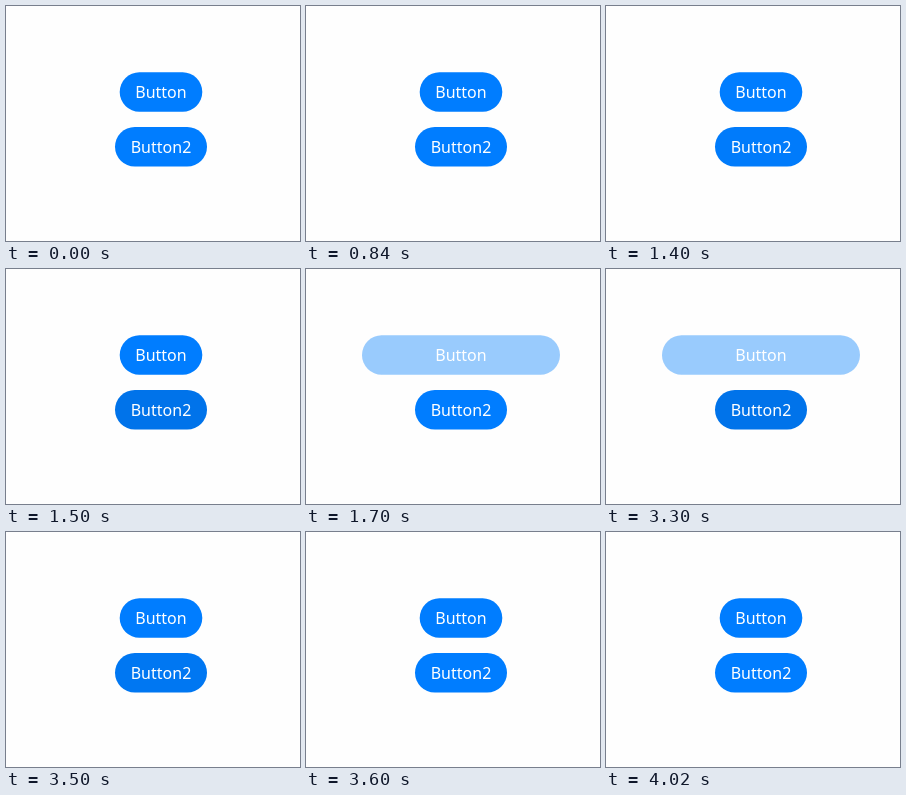
An HTML page that plays this animation: 294x235 px, repeating every 4.3 s.

```html
<!DOCTYPE html>
<html lang="en">
<head>
<meta charset="utf-8">
<title>Button states</title>
<style>
  html, body { margin: 0; width: 100%; height: 100%; overflow: hidden; background: #fefefe; }
  svg { display: block; width: 294px; height: 235px; }
  rect { fill: #007dff; animation: 4300ms step-end infinite; }
  text { font: 500 16px "Noto Sans", sans-serif; fill: #fff; text-anchor: middle; }
  .toggled { animation-name: toggle; }
  .pressed { animation-name: press; }

  /* Wide and disabled from 1700 ms to 3500 ms */
  @keyframes toggle {
    0%, 81.395% { x: 113.7px; width: 82.6px; fill: #007dff; }
    39.534% { x: 56px; width: 198px; fill: #99cbfd; }
  }

  /* Two presses, each fading in or out in short steps */
  @keyframes press {
    0%, 39.534%, 83.72% { fill: #007dff; }
    32.558% { fill: #007bfb; }
    34.883% { fill: #0073ea; }
    76.744% { fill: #0073ea; }
    81.395% { fill: #0077f2; }
  }
</style>
</head>
<body>
<svg viewBox="0 0 294 235">
  <rect class="toggled" x="113.7" y="66.3" width="82.6" height="39.5" rx="19.75"/>
  <text x="155" y="92">Button</text>
  <rect class="pressed" x="109" y="121" width="92" height="39.5" rx="19.75"/>
  <text x="155" y="146.5">Button2</text>
</svg>
</body>
</html>
```
